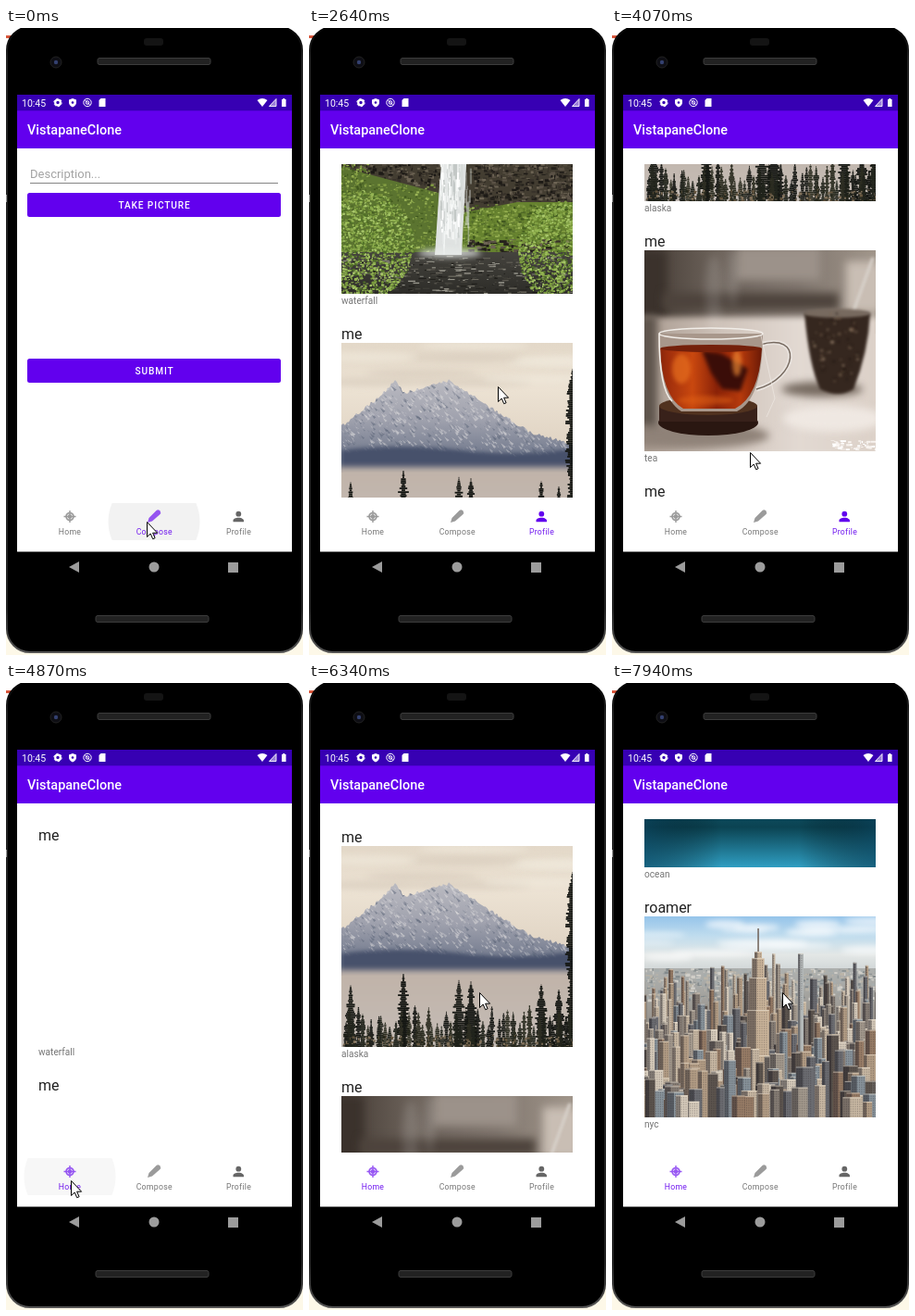
Recreate the animation shown at these times as an HTML page with a canvas. Size 321x677 px, loop 8000 ms.

```html
<!DOCTYPE html>
<html lang="en">
<head>
<meta charset="utf-8">
<title>Photo feed on a phone</title>
<style>
html, body { margin: 0; width: 321px; height: 677px; overflow: hidden; background: #fff; }
body { position: relative; font-family: Roboto, sans-serif; }
svg { position: absolute; left: 0; top: 0; }
text { font-family: Roboto, sans-serif; }
.mid { text-anchor: middle; }
.btn { font-size: 10.1px; font-weight: 500; letter-spacing: .9px; fill: #fff; }
.tab text { font-size: 8.7px; letter-spacing: .3px; fill: currentColor; opacity: .9; }
#clip { position: absolute; left: 35px; top: 147px; width: 250px; height: 360px; overflow: hidden; }
.post { position: absolute; left: 0; }
.post * { position: absolute; left: 0; white-space: nowrap; }
.post b { top: 8px; font: 16px/20px Roboto, sans-serif; color: #212121; }
.post canvas { top: 27px; }
.post i { top: 244.5px; font: 10.1px/14px Roboto, sans-serif; color: #757575; }
</style>
</head>
<body>
<svg width="321" height="677">
  <linearGradient id="gloss" x2="0" y2="1">
    <stop offset="0" stop-color="#000"/><stop offset=".05" stop-color="#222"/>
    <stop offset=".93" stop-color="#222"/><stop offset="1" stop-color="#555"/>
  </linearGradient>
  <rect y="640" width="321" height="37" fill="#fdf8e8"/>
  <rect y="8" width="8" height="3" fill="#d9573c"/>
  <rect x="1" y="-1" width="319" height="675" rx="25" stroke="url(#gloss)" stroke-width="2"/>
  <path d="M0 180h1v8h-1z" fill="#999"/>
  <rect x="149" y="11" width="21" height="8" rx="3" fill="#141414"/>
  <circle cx="54" cy="37" r="6" fill="#0e0e14" stroke="#222"/>
  <circle cx="54" cy="37" r="2.2" fill="#34406f"/>
  <g fill="#222" stroke="#3c3c3c">
    <rect x="99" y="32.5" width="122" height="7" rx="2"/>
    <rect x="97" y="634.5" width="122" height="7" rx="2"/>
  </g>
  <rect x="12" y="72" width="297" height="493.5" fill="#fff"/>
  <rect x="12" y="72" width="297" height="58" fill="#6200ee"/>
  <rect x="12" y="72" width="297" height="17.3" fill="#3700b3"/>
  <g fill="#fff">
    <text x="17" y="84.5" font-size="10.5">10:45</text>
    <circle cx="56" cy="80.5" r="2.8" fill="none" stroke="#fff" stroke-width="2.2"/>
    <circle cx="56" cy="80.5" r="4.2" fill="none" stroke="#fff" stroke-dasharray="2.2"/>
    <path d="M72 76l4 1.5v3q0 3-4 5q-4-2-4-5v-3z"/>
    <circle cx="72" cy="80.5" r="1.3" fill="#3700b3"/>
    <g fill="none" stroke="#fff"><circle cx="88" cy="80.5" r="4.2"/><circle cx="88" cy="80.5" r="1.8"/><path d="M85 77.5l6 6"/></g>
    <path d="M102.5 76h5v9h-7v-7z"/>
    <path d="M271.5 78q5.5-4 11 0l-5.5 7z"/>
    <path d="M292 76.5v8h-7.5z" fill-opacity=".5" stroke="#fff" stroke-width=".9"/>
    <path d="M298 77h1.3v-1h2v1h1.3v8h-4.6z"/>
    <text x="23" y="115" font-size="14.45" font-weight="500">VistapaneClone</text>
  </g>
  <g id="form">
    <text x="26" y="162" font-size="13" fill="#a3a3a3">Description...</text>
    <path d="M26 167.5h268" stroke="#858585"/>
    <g fill="#6200ee">
      <rect x="23" y="178" width="274" height="26" rx="2.5"/>
      <rect x="23" y="357" width="274" height="26" rx="2.5"/>
    </g>
    <text class="btn mid" x="160.5" y="194.6">TAKE PICTURE</text>
    <text class="btn mid" x="160.5" y="373.6">SUBMIT</text>
  </g>
  <clipPath id="bar"><rect x="12" y="513" width="285" height="40"/></clipPath>
  <circle id="ripple" cy="533" r="49.5" clip-path="url(#bar)"/>
  <g class="tab">
    <g opacity=".65">
      <circle cx="69" cy="527.5" r="4.8" fill="currentColor"/>
      <circle cx="69" cy="527.5" r="2.8" fill="none" stroke="#fff" stroke-width=".8"/>
      <path d="M69 521v13M62.5 527.5h13" stroke="currentColor" stroke-width="1.4"/>
    </g>
    <text class="mid" x="69" y="546.5">Home</text>
  </g>
  <g class="tab">
    <path d="M153 534l1.5-5 8-8q2-1.5 4 .5q1.5 2-.5 4l-8 7z" fill="currentColor" opacity=".65"/>
    <text class="mid" x="160.3" y="546.5">Compose</text>
  </g>
  <g class="tab">
    <path d="M245.5 533.3v-1.5c0-4 11.5-4 11.5 0v1.5z" fill="currentColor"/>
    <circle cx="251.3" cy="524.7" r="2.9" fill="currentColor"/>
    <text class="mid" x="251.5" y="546.5">Profile</text>
  </g>
  <g fill="#9c9c9c">
    <path d="M68 582l11-6v12z"/><circle cx="160" cy="582" r="5.5"/><path d="M240 577h11v11h-11z"/>
  </g>
</svg>
<div id="clip"><div id="feed"></div></div>
<svg id="cursor" width="14" height="21" overflow="visible">
  <path d="M.5.5v16l3.700-3.500 2.500 5.700 2.400-1-2.500-5.500h5z" fill="#fff" stroke="#000"/>
</svg>
<script>
const $ = id => document.getElementById(id);
const W = 250, H = 217, PITCH = 270;
let seed = 7, g;
const rnd = () => (seed = seed * 16807 % 2147483647) / 2147483647;
const pick = a => a[rnd() * a.length | 0];

// Values between key points [k, ...values], joined by straight lines.
function along(keys, k) {
  const i = keys.findIndex(p => p[0] > k);
  if (i < 1) return keys.at(i).slice(1);
  const [a, b] = [keys[i - 1], keys[i]], f = (k - a[0]) / (b[0] - a[0]);
  return a.slice(1).map((v, j) => v + (b[j + 1] - v) * f);
}

function rect(c, x, y, w, h) { g.fillStyle = c; g.fillRect(x, y, w, h); }
function shape(c, d) { g.fillStyle = c; g.fill(new Path2D(d)); }
function line(c, w, d) { g.strokeStyle = c; g.lineWidth = w; g.stroke(new Path2D(d)); }
function oval(c, x, y, rx, ry) {
  g.fillStyle = c;
  g.beginPath();
  g.ellipse(x, y, rx, ry, 0, 0, 7);
  g.fill();
}
function fade(x, y, ...cols) {
  const f = g.createLinearGradient(0, 0, x, y);
  cols.forEach((c, i) => f.addColorStop(i / (cols.length - 1), c));
  return f;
}
function soft(px, draw) { g.filter = `blur(${px}px)`; draw(); g.filter = 'none'; }
function specks(n, x, y, w, h, cols, sw, sh = sw) {
  while (n--) rect(pick(cols), x + rnd() * w, y + rnd() * h, .5 + rnd() * sw, .5 + rnd() * sh);
}
function bush(n, x, y, rx, ry, cols) {
  while (n--) {
    const a = rnd() * 6.3, r = Math.sqrt(rnd());
    oval(pick(cols), x + rx * r * Math.cos(a), y + ry * r * Math.sin(a), .5 + rnd() * 1.4, .5 + rnd());
  }
}
function spruce(x, top, half, c) {
  for (let y = top; y < H; y += 2) {
    const w = Math.min(half, .6 + (y - top) * .2) * (.4 + rnd() * .8);
    rect(c, x - w, y, w * 2, 1.8);
  }
}

function waterfall() {
  const rock = ['#25211c', '#5b5246', '#6d6454', '#1d1a16', '#38322a'];
  const leaf = ['#87a145', '#566f2c', '#9bb556', '#41581f', '#738d38'];
  rect('#433d31', 0, 0, W, H);
  rect('#bcc3b0', 0, 0, 165, 30);
  specks(260, 0, -10, 165, 34, ['#3c4a2a', '#62704a', '#2c3320', '#8c9a78'], 4, 15);
  specks(700, 0, 34, 108, 66, rock, 5, 3);
  specks(1100, 136, 26, 114, 92, rock, 5, 3);
  specks(300, 165, 0, 85, 28, rock, 6, 3);
  specks(200, 0, 25, 112, 8, leaf, 4, 3);
  shape('#5b7430', 'M0 80L105 108V178H0z');
  shape('#66822f', 'M128 130L190 118H250V176H128z');
  specks(600, 4, 98, 98, 74, leaf, 3, 2);
  specks(800, 130, 120, 120, 46, leaf, 4, 2);
  specks(150, 134, 158, 110, 17, rock, 8, 3);
  rect(fade(0, H, '#66645c', '#66645c', '#2d2c28'), 0, 172, W, 45);
  specks(450, 0, 176, W, 41, ['#201f1b', '#6b685e', '#48463f', '#99978d'], 8, 1);
  shape('#dfe2e1', 'M112 32L132 30 136 60 130 175H101L106 100z');
  specks(190, 106, 34, 22, 118, ['#fff', '#f4f6f5', '#c3c8c6', '#e6e9e8'], 2, 24);
  specks(30, 129, 36, 10, 105, ['#c9ccc866', '#e4e6e366'], 2, 28);
  soft(3, () => oval('#e8ebe9cc', 117, 173, 34, 5));
  const lush = ['#94b552', '#7a9a3e', '#506f28', '#a8c76a', '#87a84a'];
  bush(2200, 18, 165, 60, 60, lush);
  bush(1500, 236, 172, 44, 55, lush);
  bush(350, 6, 85, 25, 36, leaf);
}

function mountain() {
  const ridge = [[0, 90], [42, 58], [58, 40], [68, 55], [104, 43], [116, 41], [155, 66], [205, 97], [W, 109]];
  rect(fade(0, 100, '#e3d8c8', '#ece2d3', '#e2d6c6'), 0, 0, W, H);
  soft(3, () => {
    for (let i = 0; i < 9; i++) oval(i % 2 ? '#d8ccbc99' : '#f1e9dc99', rnd() * W, rnd() * 60, 60, 5);
  });
  g.save();
  g.beginPath();
  for (let x = 0; x <= W; x += 2) g.lineTo(x, along(ridge, x)[0] + rnd() * 4 - 2);
  g.lineTo(W, 140);
  g.lineTo(0, 140);
  g.clip();
  rect(fade(0, 125, '#b9b9c0', '#b9b9c0', '#9fa1ad', '#6f778b'), 0, 35, W, 105);
  for (let i = 0; i < 1300; i++) {
    const l = 1 + rnd() * 5;
    shape(pick(['#d9d8da88', '#c5c5cb88', '#5f677a88', '#80869588', '#dedcdc88']),
      `M${rnd() * W} ${40 + rnd() * 80}l${l} ${l * .7}l${-l * .4} ${l * .3}z`);
  }
  soft(2, () => shape('#47516b', 'M0 116Q60 108 130 116T260 112V145H0z'));
  g.restore();
  soft(3, () => rect(fade(0, H, '#a9a3a5', '#a9a3a5', '#c1b4aa', '#c4bcb6'), -5, 134, W + 10, 90));
  const dark = ['#141612', '#20231b', '#2b2c20'];
  for (const x of [10, 67, 127, 140, 216, 235]) spruce(x, 138 + rnd() * 25, 6, dark[0]);
  spruce(W, 28, 7, dark[0]);
  for (let x = 2; x < W; x += 5) spruce(x + rnd() * 4, 172 + rnd() * 24, 3, pick(dark));
  specks(200, 0, 204, W, 13, ['#66563f', '#26281c', '#80705a'], 3);
}

function tea() {
  rect(fade(W, 0, '#453c35', '#6f655d', '#80766e', '#a0958a'), 0, 0, W, 90);
  soft(5, () => {
    rect('#3b322c', -10, 0, 34, 85);
    rect('#9c928a', 100, -4, 90, 36);
    rect('#4d433c', 20, 46, 190, 18);
    rect('#c9beb4', 218, 12, 40, 55);
  });
  soft(3, () => rect(fade(W, 0, '#a99b90', '#cfc3ba', '#e2d9d2', '#dcd1c8'), -5, 72, W + 10, 150));
  soft(4, () => {
    oval('#75695f', 192, 150, 44, 8);
    oval('#8f8278', 50, 200, 85, 14);
    rect('#5f554d', -8, 70, 22, 120);
    oval('#efe8e2', 205, 182, 55, 14);
  });
  soft(1.5, () => {
    line('#d8d2cb', 3, 'M226 66L247 8');
    shape('#35271f', 'M173 68H244Q242 110 226 150Q210 160 190 150Q178 125 173 68z');
    oval('#776a5f', 208, 68, 36, 5);
    bush(60, 208, 105, 27, 38, ['#a58e74', '#7d6650', '#1d1410']);
  });
  oval('#2a1711', 69, 186, 54, 14);
  rect('#38211a', 16, 168, 106, 17);
  oval('#51321f', 69, 168, 53, 10);
  const handle = 'M125 102C172 88 166 138 121 150';
  line('#e9e3de', 5, handle);
  line('#76695f', 1.5, handle);
  shape('#a8978b', 'M15 90H128Q128 160 100 174H40Q14 158 15 90z');
  shape(fade(130, 0, '#5f1507', '#a12f0c', '#c9480f', '#8a2208', '#b63a0c', '#611505'),
    'M17 106H127Q124 158 98 171H42Q19 158 17 106z');
  soft(2, () => {
    shape('#3a0d08', 'M62 108L84 112 112 128 104 152 84 150 72 132z');
    oval('#e9701faa', 40, 128, 10, 16);
    oval('#e0601588', 66, 162, 30, 5);
    oval('#ef8a35aa', 100, 122, 5, 14);
  });
  oval('#74200a', 72, 106, 55, 4);
  line('#f1ede8', 1.6, 'M16 90a56 6 0 0 1 112 0a56 6 0 0 1-112 0Q16 150 30 163');
  line('#f1ede8', .6, 'M126 92L141 160 132 180');
  soft(5, () => { oval('#fff2', 75, 45, 9, 40); oval('#fff2', 95, 30, 6, 32); });
  specks(60, 200, 205, 50, 10, ['#fff', '#f8f3ef'], 6, 2);
}

function ocean() {
  rect(fade(0, H, '#2a8aa6', '#2385a4', '#1a7594', '#125f7c', '#0b4352', '#2f9ec2'), 0, 0, W, H);
  rect(fade(W, 0, '#083c5599', '#0000', '#0000', '#083c5599'), 0, 0, W, H);
  soft(14, () => {
    oval('#7fe3ea', 120, 40, 42, 62);
    oval('#eaffff', 120, 12, 36, 34);
  });
  soft(4, () => {
    for (let i = 0; i < 30; i++) {
      const x = -120 + i * 16 + rnd() * 10;
      shape(i % 2 ? '#b5f0f438' : '#0a4a6633', `M114 0h10L${x + 14} 150H${x}z`);
    }
  });
  for (let i = 0; i < 1300; i++) {
    const y = 75 * rnd() ** 1.6, x = rnd() * W, near = Math.abs(x - 120) < 55;
    oval(pick(near ? ['#e8ffff99', '#a9ecf088', '#2f94af66'] : ['#0f506a99', '#6cc4d466', '#17677f99', '#0c465f88']),
      x, y, 1 + rnd() * 6, .3 + rnd() * .8);
  }
}

function city() {
  rect(fade(0, 62, '#95c4ea', '#bfdcee', '#e3e7e6', '#cdd3d4'), 0, 0, W, H);
  soft(3, () => {
    for (let i = 0; i < 16; i++) oval('#fffa', rnd() * W, 4 + rnd() * 40, 20 + rnd() * 30, 1 + rnd() * 4);
  });
  rect(fade(0, H, '#bcc4c6', '#a9aaa7', '#8a8177', '#5f5750'), 0, 56, W, H);
  specks(700, 0, 56, W, 34, ['#a7adad', '#d0cec8', '#bab4a8', '#848b8d'], 5, 3);
  const walls = ['#b39d85', '#c8b8a3', '#857c74', '#977c66', '#6b6c71', '#d6cbbb', '#a3998d', '#5c544e', '#87929a'];
  const tower = (x, y, w, c) => {
    rect(c, x, y, w, H);
    rect('#221f2677', x, y, w * .4, H);
    rect('#eee4d688', x, y, w, 1);
    for (let r = y + 2; r < Math.min(H, y + 60); r += 2.5)
      for (let k = x + 1; k < x + w - 1; k += 2.4) rect('#2e292a55', k, r, 1, 1.3);
  };
  const N = 420;
  for (let i = 0; i < N; i++) {
    const d = i / N, w = 3 + d * 13 * (.4 + rnd());
    tower(rnd() * 260 - 8, 66 + d * 125 + rnd() * 14 - rnd() ** 3 * 34, w, pick(walls));
    if (i == 300) {
      tower(166, 40, 6, '#b3b8b8');
      rect('#6f6258', 122.3, 13, 1.5, 32);
      for (let k = 0; k < 5; k++) tower(119 - k * 2.6, 38 + k * k * 7, 8 + k * 5.2, '#c9b399');
    }
  }
}

const shots = [[waterfall, 'waterfall'], [mountain, 'alaska'], [tea, 'tea'], [ocean, 'ocean'], [city, 'nyc']];
const posts = shots.map(([paint, caption], i) => {
  const box = document.createElement('div');
  box.className = 'post';
  box.style.top = i * PITCH + 'px';
  box.innerHTML = `<b></b><canvas width="${W}" height="${H}"></canvas><i>${caption}</i>`;
  $('feed').append(box);
  const photo = box.querySelector('canvas');
  g = photo.getContext('2d');
  paint();
  return { name: box.querySelector('b'), photo };
});

const STEP = 132.5, LEAD = 38, PROFILE = 7, HOME = 36;
const pointer = [[0, 152, 533], [4, 263, 530], [5, 263, 534], [11, 263, 534], [14, 198, 410], [15, 204, 387],
  [30, 204, 387], [32, 93, 529], [34, 70, 537], [37, 70, 537], [40, 184, 334]];
const homeScroll = [[42, 0], [43, 122], [48, 268], [53, 610], [60, 1002]];
const tabs = document.querySelectorAll('.tab');

function draw() {
  const k = Math.floor((performance.now() % 8000 + LEAD) / STEP);
  const tab = k < PROFILE ? 1 : k < HOME ? 2 : 0;
  const since = [k - HOME, 0, k - PROFILE][tab];
  const shade = Math.min(255, 242 + since * 5);
  const scroll = tab ? Math.min(474, Math.max(0, (k - 16.9) * 33.64)) : along(homeScroll, k)[0];
  const [x, y] = along(pointer, k).map(Math.round);
  $('cursor').style.transform = `translate(${x}px,${y}px)`;
  $('form').style.display = tab == 1 ? '' : 'none';
  $('ripple').setAttribute('cx', 69 + tab * 91);
  $('ripple').setAttribute('fill', `rgb(${shade},${shade},${shade})`);
  tabs.forEach((e, i) => e.style.color = i == tab ? '#6200ee' : '#666');
  $('clip').style.display = since > 0 ? '' : 'none';
  $('feed').style.transform = `translateY(${-Math.round(scroll)}px)`;
  posts.forEach((p, i) => {
    p.name.textContent = tab == 0 && i > 2 ? 'roamer' : 'me';
    p.photo.style.display = since > 1 ? '' : 'none';
  });
  requestAnimationFrame(draw);
}
draw();
</script>
</body>
</html>
```
